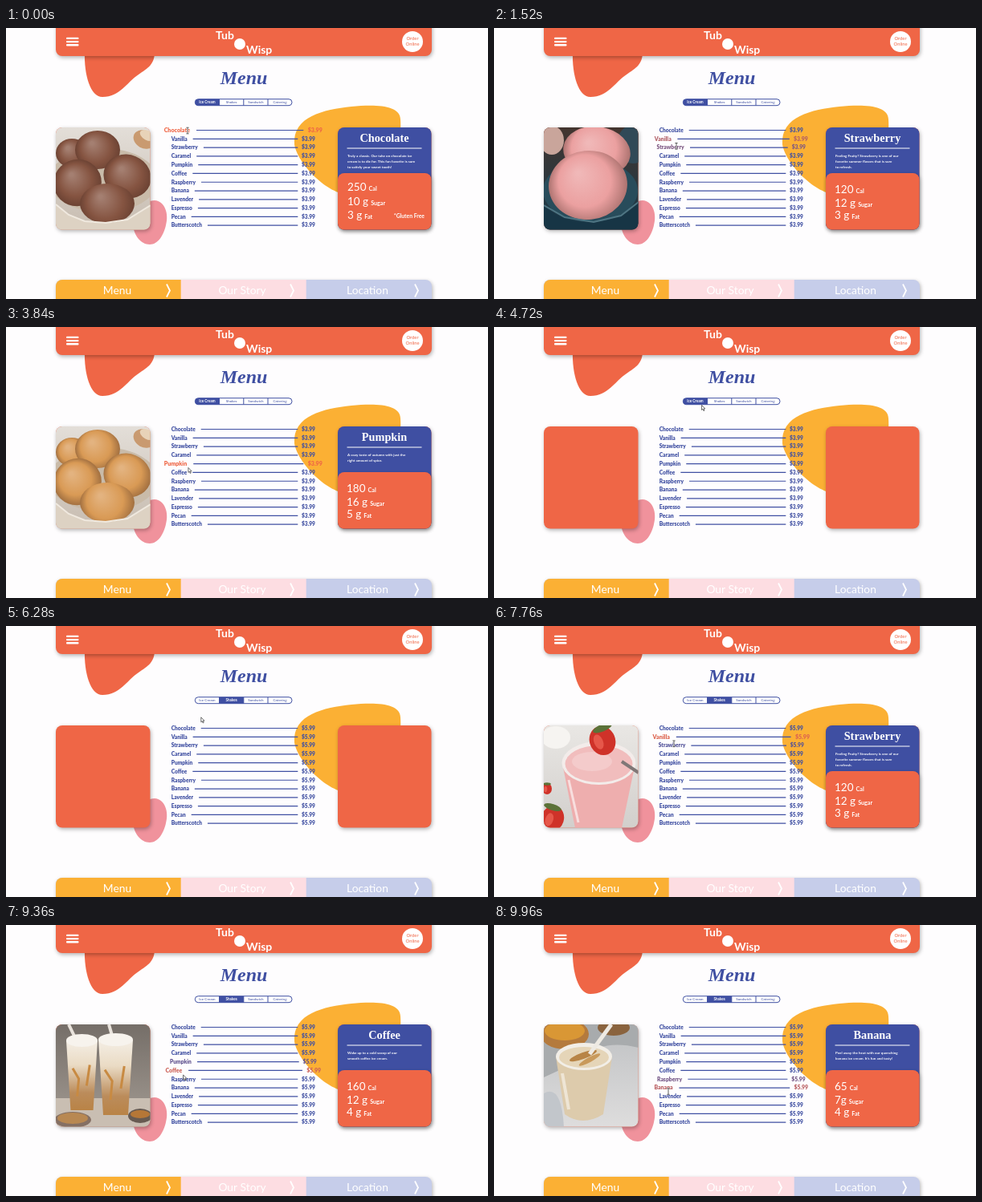
These frames come from a looping animation (600x338 px, 10000 ms). An HTML page with a canvas:

```html
<!DOCTYPE html>
<html lang="en">
<head>
<meta charset="utf-8">
<title>Ice cream menu</title>
<style>
html, body { margin: 0; width: 100%; height: 100%; overflow: hidden; background: #fefdfe; }
canvas { display: block; width: 600px; height: 338px; }
</style>
</head>
<body>
<canvas id="stage"></canvas>
<script>
const canvas = document.getElementById('stage');
const ctx = canvas.getContext('2d');
const scale = window.devicePixelRatio || 1;
canvas.width = 600 * scale;
canvas.height = 338 * scale;

const LOOP = 10000, FADE = 300, TAB_SWITCH = 5500;
const ORANGE = '#ef6646', BLUE = '#3f4fa2', YELLOW = '#fbb034', PINK = '#f0929c', WHITE = '#ffffff';
const SANS = 'Lato, sans-serif', SERIF = '"Liberation Serif", serif';
const ROW_TOP = 125, ROW_STEP = 10.8;

// name, photo tint, calories, sugar, fat, description
const FLAVORS = [
  ['Chocolate', '#855441', '250', '10 g', '3 g', ['Truly a classic. Our take on chocolate ice', 'cream is to die for. This fan favorite is sure', 'to satisfy your sweet tooth!']],
  ['Vanilla', '#f0e3c4', '210', '14 g', '7 g', ['Simple, smooth and creamy. Vanilla is', 'always a good idea.']],
  ['Strawberry', '#eba0a0', '120', '12 g', '3 g', ['Feeling Fruity? Strawberry is one of our', 'favorite summer flavors that is sure', 'to refresh.']],
  ['Caramel', '#e8dcc8', '290', '22 g', '8 g', ['A caramel so sweet and rich that it\u2019ll', 'leave you begging for more...']],
  ['Pumpkin', '#d99a55', '180', '16 g', '5 g', ['A cozy taste of autumn with just the', 'right amount of spice.']],
  ['Coffee', '#b08d70', '160', '12 g', '4 g', ['Wake up to a cold scoop of our', 'smooth coffee ice cream.']],
  ['Raspberry', '#cf5874', '110', '13 g', '2 g', ['Sweet, tart and bright. A berry good', 'way to cool down.']],
  ['Banana', '#e5d5b8', '65', '7g', '4 g', ['Peel away the heat with our quenching', 'banana ice cream. It\u2019s fun and tasty!']],
  ['Lavender', '#b9a3d0', '130', '11 g', '4 g', ['A calm and floral scoop for slow', 'summer evenings.']],
  ['Espresso', '#6b4632', '170', '10 g', '4 g', ['Bold, dark and creamy. A strong', 'finish to any meal.']],
  ['Pecan', '#cda77c', '260', '15 g', '9 g', ['Roasted and buttery with a crunch', 'in every bite.']],
  ['Butterscotch', '#e0b064', '280', '21 g', '8 g', ['Golden, rich and sweet. An old', 'time favorite.']]
];

// Pointer path: time, x, y
const PATH = [
  [0, 226, 128], [1420, 226.6, 146.6], [1520, 227, 147.3], [2960, 226.7, 161],
  [3700, 226, 174], [4000, 228, 177], [4350, 250, 122], [4600, 258, 98], [4720, 258.5, 97.5],
  [5300, 278, 92], [5850, 278, 93], [6450, 229, 122], [6600, 226, 128], [7100, 225, 137],
  [7745, 224, 146.62], [7760, 224, 146.8], [8800, 224, 167.6], [9960, 217, 207.5], [LOOP, 217, 208]
];

function pointer(t) {
  const i = Math.max(1, PATH.findIndex(p => p[0] >= t));
  const [a, b] = [PATH[i - 1], PATH[i]];
  const k = (t - a[0]) / (b[0] - a[0]);
  return { x: a[1] + (b[1] - a[1]) * k, y: a[2] + (b[2] - a[2]) * k };
}

function hoveredRow(t) {
  const i = Math.floor((pointer(t).y - ROW_TOP) / ROW_STEP);
  return i >= 0 && i < FLAVORS.length ? i : -1;
}

// Share of the fade window during which each row was hovered
function highlights(t) {
  const amount = FLAVORS.map(() => 0), n = 20;
  for (let s = 0; s < n; s++) {
    const i = hoveredRow(Math.max(0, t - FADE * s / n));
    if (i >= 0) amount[i] += 1 / n;
  }
  return amount.map(k => Math.min(1, k));
}

// Blends two six-digit hex colours
function mix(a, b, k) {
  const part = (c, i) => parseInt(c.slice(i, i + 2), 16);
  return '#' + [1, 3, 5].map(i =>
    Math.round(part(a, i) + (part(b, i) - part(a, i)) * k).toString(16).padStart(2, '0')).join('');
}

function text(str, x, y, size, color, { weight = 400, family = SANS, align = 'left' } = {}) {
  ctx.font = `${weight} ${size}px ${family}`;
  ctx.textAlign = align;
  ctx.fillStyle = color;
  ctx.fillText(str, x, y);
  return ctx.measureText(str).width;
}

function rect(x, y, w, h, r, color) {
  ctx.beginPath();
  ctx.roundRect(x, y, w, h, r);
  ctx.fillStyle = color;
  ctx.fill();
}

function oval(x, y, rx, ry, color, turn = 0) {
  ctx.beginPath();
  ctx.ellipse(x, y, rx, ry, turn, 0, 7);
  ctx.fillStyle = color;
  ctx.fill();
}

function line(color, width, ...pts) {
  ctx.beginPath();
  for (let i = 0; i < pts.length; i += 2) ctx.lineTo(pts[i], pts[i + 1]);
  ctx.strokeStyle = color;
  ctx.lineWidth = width;
  ctx.stroke();
}

function shape(d, color) {
  ctx.fillStyle = color;
  ctx.fill(new Path2D(d));
}

function withShadow(draw) {
  ctx.save();
  ctx.shadowColor = 'rgba(0,0,0,.3)';
  ctx.shadowBlur = 5 * scale;
  ctx.shadowOffsetX = scale;
  ctx.shadowOffsetY = 2 * scale;
  draw();
  ctx.restore();
}

function backdrop(top, bottom) {
  const g = ctx.createLinearGradient(0, 124, 0, 252);
  g.addColorStop(0, top);
  g.addColorStop(1, bottom);
  rect(62, 124, 118, 128, 0, g);
}

function scoop(x, y, rx, ry, color, turn = 0) {
  const g = ctx.createRadialGradient(x - rx * .25, y - ry * .35, 2, x, y, Math.max(rx, ry));
  g.addColorStop(0, mix(color, WHITE, .25));
  g.addColorStop(.65, color);
  g.addColorStop(1, mix(color, '#3a2018', .35));
  oval(x, y, rx, ry, g, turn);
}

function bowlPhoto(tint) {
  backdrop('#e3ded8', '#c7bcb0');
  oval(172, 139, 14, 11, '#c99a70', .5);
  oval(176, 134, 10, 6, '#e8d3b8', .5);
  oval(121, 190, 68, 40, '#c9bba9');
  scoop(82, 156, 20, 18, tint);
  scoop(114, 152, 28, 24, tint);
  scoop(151, 185, 30, 27, tint, .4);
  scoop(89, 193, 30, 29, tint, -.4);
  scoop(126, 219, 34, 25, tint);
  shape('M62 220Q82 241 116 243Q151 245 180 221V252H62Z', '#ddd2c3');
  line('#f0e9df', 2, 62, 220, 78, 233, 98, 241, 124, 243, 151, 239, 180, 221);
}

function cupPhoto(tint) {
  backdrop('#44352f', '#17394b');
  oval(72, 140, 15, 18, '#c9a59b');
  oval(173, 145, 20, 24, '#304957');
  scoop(128, 154, 42, 31, tint, .15);
  oval(120, 203, 59, 39, '#284c5b');
  scoop(117, 196, 49, 43, tint, -.1);
  shape('M62 222Q90 246 128 242Q163 239 180 217V252H62Z', '#173545');
  line('#4e7583', 2, 62, 221, 88, 236, 124, 242, 158, 234, 180, 217);
}

function stackPhoto(tint) {
  backdrop('#c3d1ec', '#b9c9e7');
  scoop(124, 220, 54, 41, tint);
  oval(121, 185, 39, 9, '#8a6a48', .08);
  scoop(122, 155, 43, 34, tint);
  oval(106, 166, 18, 5, '#b58e5f', .5);
  oval(135, 190, 20, 6, '#d9c29d', -.25);
}

function strawberry(x, y, r, turn) {
  oval(x, y, r, r * 1.15, '#cf3229', turn);
  oval(x - r * .3, y + r * .1, r * .35, r * .6, '#e6574a', turn);
  oval(x, y - r, r * .8, r * .28, '#5b7238', turn);
}

function topGlassPhoto(tint) {
  backdrop('#e9e7e4', '#d2cfcc');
  oval(77, 139, 18, 14, '#f6f4f1');
  shape('M85 171L101 252H159L176 171Z', mix(tint, WHITE, .15));
  oval(130.5, 171, 46, 27, '#f3ecea');
  oval(130.5, 172, 42, 23, mix(tint, WHITE, .3));
  oval(122, 169, 25, 12, mix(tint, WHITE, .45));
  line('rgba(255,255,255,.6)', 3, 93, 192, 105, 245);
  line('#807777', 4, 159, 169, 180, 183);
  strawberry(135, 143, 16, -.4);
  strawberry(73, 240, 14, .3);
  strawberry(66, 203, 6, 0);
}

function tallGlass(x, y, w, h, tint) {
  const g = ctx.createLinearGradient(0, y, 0, y + h);
  g.addColorStop(0, '#f4eee5');
  g.addColorStop(.35, '#eadbc4');
  g.addColorStop(.75, mix(tint, '#c58a45', .5));
  g.addColorStop(1, '#b98346');
  shape(`M${x} ${y}h${w}l${-w * .14} ${h}h${-w * .72}Z`, g);
  oval(x + w / 2, y, w / 2, 8, '#f7f3ed');
  line('#c88a42', 3, x + 8, y + h * .4, x + w * .4, y + h * .55, x + w * .35, y + h * .8);
  line('#c88a42', 3, x + w * .75, y + h * .35, x + w * .65, y + h * .65);
}

function tallGlassPhoto(tint) {
  backdrop('#756e68', '#a39b93');
  rect(62, 216, 118, 36, 0, '#c9beb2');
  line('#e9e3dc', 4, 78, 124, 91, 151);
  line('#e9e3dc', 4, 128, 124, 135, 148);
  tallGlass(75, 144, 39, 87, tint);
  tallGlass(115, 143, 43, 94, tint);
  oval(83, 243, 23, 10, '#857064');
  oval(83, 241, 19, 7, '#b88852');
  oval(167, 238, 15, 9, '#675a51');
  oval(167, 236, 12, 5, '#b57737');
}

function clothGlassPhoto(tint) {
  backdrop('#bfc1c3', '#dedddd');
  shape('M62 124H180V153Q133 142 114 166L62 190Z', '#a8abad');
  oval(88, 136, 30, 19, '#b47a3d');
  oval(88, 132, 25, 12, '#d99735');
  oval(149, 128, 20, 10, '#8a633e');
  shape('M62 210Q84 198 87 252H62Z', '#c2c6cb');
  shape('M77 164L88 236Q110 252 136 236L147 164Z', mix(tint, '#b99b74', .18));
  oval(112, 164, 35, 17, '#f2eee7');
  oval(112, 165, 31, 13, tint);
  oval(111, 163, 18, 4, '#b88446', -.35);
  oval(119, 168, 15, 3, '#c99a5c', -.5);
  line('#eeeae3', 5, 119, 161, 146, 124);
  line('rgba(255,255,255,.5)', 4, 85, 185, 93, 230);
}

function photo(row, shakes) {
  const [name, tint] = FLAVORS[row];
  const scenes = shakes
    ? { Strawberry: topGlassPhoto, Caramel: tallGlassPhoto, Coffee: tallGlassPhoto }
    : { Strawberry: cupPhoto, Raspberry: cupPhoto, Caramel: stackPhoto, Vanilla: stackPhoto };
  const scene = scenes[name] || (shakes ? clothGlassPhoto : bowlPhoto);
  ctx.save();
  ctx.beginPath();
  ctx.roundRect(62, 124, 117.5, 127.5, 8);
  ctx.clip();
  scene(tint);
  ctx.restore();
}

function card(row) {
  const [name, , cal, sugar, fat, lines] = FLAVORS[row];
  rect(413, 124, 116.5, 127.5, 8, BLUE);
  withShadow(() => rect(413, 181, 116.5, 70.5, 8, ORANGE));
  text(name, 471, 141.5, 14.3, WHITE, { weight: 700, family: SERIF, align: 'center' });
  line(WHITE, 1, 424.5, 150, 517.5, 150);
  lines.forEach((s, i) => text(s, 425, 160.6 + i * 7, 4.5, WHITE, { weight: 700 }));
  const first = row === 0;
  const x = first ? 425 : 424;
  const ys = first ? [203.3, 221, 238] : [205.7, 222.7, 238];
  [[cal, 'Cal'], [sugar, 'Sugar'], [fat, 'Fat']].forEach(([value, unit], i) => {
    const w = text(value, x, ys[i], 13.5, WHITE);
    text(unit, x + w + 3, ys[i], 7.2, WHITE, { weight: 700 });
  });
  if (first) text('*Gluten Free', 521, 237, 6.8, WHITE, { weight: 700, align: 'right' });
}

function panels(row, shakes) {
  withShadow(() => {
    rect(62, 124, 117.5, 127.5, 8, ORANGE);
    rect(413, 124, 116.5, 127.5, 8, ORANGE);
  });
  if (row < 0) return;
  photo(row, shakes);
  card(row);
}

function blobs() {
  shape('M98 30C97 58 105 86 120 86C142 86 150 68 165 58C177 50 185 45 185 30Z', ORANGE);
  shape('M359 145C357 110 395 102 430 98C460 95 491 96 491 114C493 140 484 208 428 208C400 208 362 168 359 145Z', YELLOW);
  shape('M158 245C158 229 172 215 185 215C198 216 203 232 199 246C196 259 189 270 179 270C168 270 159 259 158 245Z', PINK);
}

function header() {
  withShadow(() => rect(62, -10, 468, 45, 8, ORANGE));
  for (let i = 0; i < 3; i++) rect(75, 11.7 + i * 4.2, 15.5, 2.4, 1, WHITE);
  text('Tub', 261, 14, 14, WHITE, { weight: 700 });
  text('Wisp', 299, 31.5, 14, WHITE, { weight: 700 });
  oval(291, 20, 7, 7, WHITE);
  oval(506, 17, 13, 13, WHITE);
  text('Order', 506, 15.3, 5.8, ORANGE, { align: 'center' });
  text('Online', 506, 21.5, 5.8, ORANGE, { align: 'center' });
  text('Menu', 296, 69.5, 24, BLUE, { weight: 'italic 700', family: SERIF, align: 'center' });
}

function tabs(active) {
  const edges = [235.3, 265.5, 295.8, 326, 356];
  ctx.save();
  ctx.beginPath();
  ctx.roundRect(235.3, 88.7, 120.7, 8, 4);
  ctx.fillStyle = WHITE;
  ctx.fill();
  ctx.clip();
  rect(edges[active], 88, edges[active + 1] - edges[active], 10, 0, BLUE);
  ctx.restore();
  ctx.beginPath();
  ctx.roundRect(235.3, 88.7, 120.7, 8, 4);
  ctx.strokeStyle = BLUE;
  ctx.lineWidth = 1;
  ctx.stroke();
  for (const x of edges.slice(1, 4)) line(BLUE, 1, x, 89, x, 96.5);
  ['Ice Cream', 'Shakes', 'Sandwich', 'Catering'].forEach((label, i) =>
    text(label, (edges[i] + edges[i + 1]) / 2, 94.3, 4.6, i === active ? WHITE : BLUE,
      { weight: i === active ? 700 : 400, align: 'center' }));
}

// Draws the price list and returns the right edge of each label
function list(amounts, price) {
  return FLAVORS.map(([name], i) => {
    const k = amounts[i], y = 127.5 + i * 10.79;
    const size = 6.6 + .5 * k, color = mix(BLUE, ORANGE, k);
    const x = 205.7 - 9 * k;
    const end = x + text(name, x, y + 2.3, size, color, { weight: 900 });
    line(BLUE, 1.2, end + 7 + k, y, 363.3 + 7 * k, y);
    text(price, 368 + 7.7 * k, y + 2.3, size, color, { weight: 900 });
    return end;
  });
}

function footer() {
  withShadow(() => rect(62, 314, 468, 40, 8, '#c6cdea'));
  rect(62, 314, 156, 40, [8, 0, 0, 0], YELLOW);
  rect(217.7, 314, 156, 40, 0, '#fddde2');
  [['Menu', 138.5, 200], ['Our Story', 294, 354], ['Location', 450, 509]].forEach(([label, x, arrow]) => {
    text(label, x, 332.3, 13.8, WHITE, { align: 'center' });
    line(WHITE, 1.8, arrow, 319.5, arrow + 4, 327.5, arrow, 335.5);
  });
}

function drawPointer({ x, y }, overText) {
  if (overText) {
    for (const [color, w] of [[WHITE, 1.6], ['#333', .8]]) {
      line(color, w, x, y - 3.5, x, y + 3.5);
      line(color, w, x - 1.6, y - 3.8, x + 1.6, y - 3.8);
      line(color, w, x - 1.6, y + 3.8, x + 1.6, y + 3.8);
    }
    return;
  }
  const arrow = new Path2D(`M${x} ${y}v6l1.4-1.2 1 2.3 1-.5-1-2.2h1.8Z`);
  ctx.fillStyle = WHITE;
  ctx.fill(arrow);
  ctx.strokeStyle = '#333';
  ctx.lineWidth = .7;
  ctx.stroke(arrow);
}

function draw(t) {
  const shakes = t >= TAB_SWITCH;
  const row = hoveredRow(t), pos = pointer(t);
  ctx.setTransform(scale, 0, 0, scale, 0, 0);
  rect(0, 0, 600, 338, 0, '#fefdfe');
  blobs();
  header();
  tabs(shakes ? 1 : 0);
  panels(row, shakes);
  const ends = list(highlights(t), shakes ? '$5.99' : '$3.99');
  footer();
  drawPointer(pos, row >= 0 && pos.x < ends[row]);
}

const start = performance.now();
function tick() {
  draw((performance.now() - start) % LOOP);
  requestAnimationFrame(tick);
}
tick();
</script>
</body>
</html>
```
